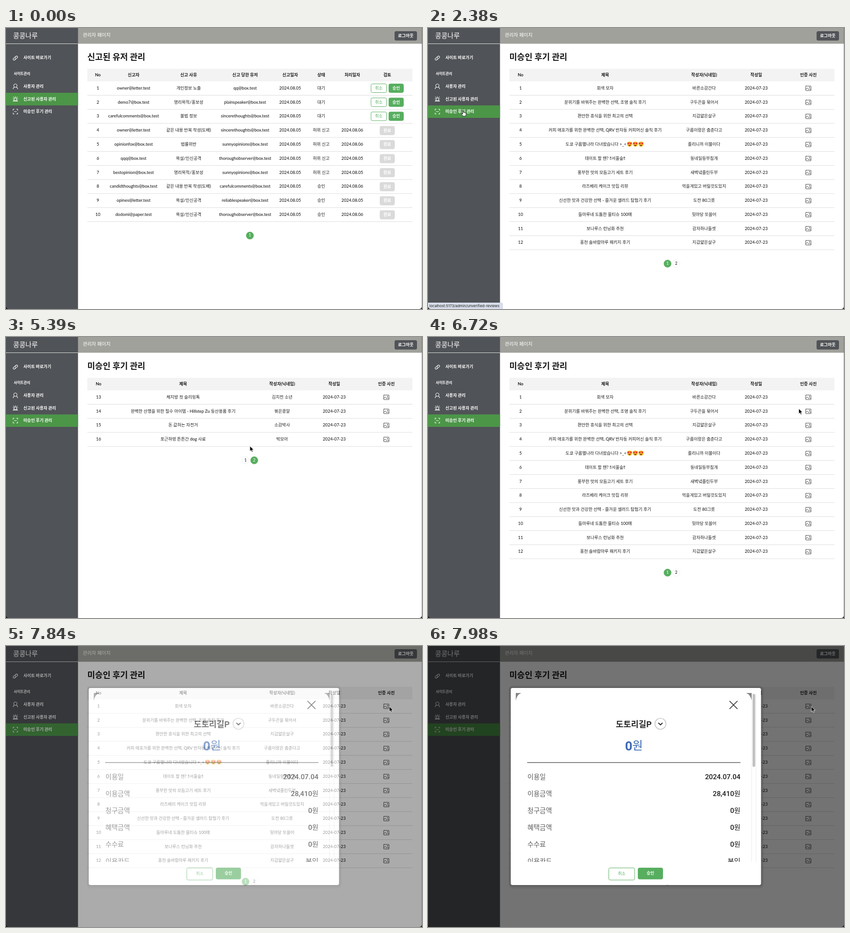
An HTML page that plays this animation: 910x616 px, repeating every 8000 ms.

```html
<!DOCTYPE html>
<html lang="ko">
<head>
<meta charset="utf-8">
<title>관리자 페이지</title>
<style>
html, body { margin: 0; width: 100%; height: 100%; overflow: hidden; background: #fff; }
svg { display: block; width: 910px; height: 616px; }
text { font: 500 9.3px Lato, "Noto Sans CJK KR", "Noto Sans CJK", sans-serif; fill: #1c1c1c; }
.mid { text-anchor: middle; }
.end { text-anchor: end; }
.bold { font-weight: 700; }
.line { fill: none; stroke-linecap: round; stroke-linejoin: round; }
.receipt text { font-family: Roboto, "Noto Sans CJK KR", "Noto Sans CJK", sans-serif; }
.receipt .bold { font-weight: 700; }

#reports, #reviews, #list1, #list2, #oldItem, #newItem, #status, #dialog, #cursor, #arrow, #hand, #ring {
  animation: 8s step-end infinite;
}
#reports { animation-name: reports; }
#reviews { animation-name: reviews; }
#list1 { animation-name: list1; }
#list2 { animation-name: list2; }
#oldItem { animation-name: oldItem; }
#newItem { animation-name: newItem; }
#status { animation-name: status; }
#dialog { animation-name: dialog; }
#cursor { animation-name: move; }
#arrow { animation-name: arrow; }
#hand { animation-name: hand; }
#ring { animation-name: ring; }

@keyframes reports { 0% { opacity: 1 } 28.875%, 100% { opacity: 0 } }
@keyframes reviews { 0% { opacity: 0 } 28.875%, 100% { opacity: 1 } }
@keyframes list1 { 0%, 74.375%, 100% { opacity: 1 } 55.125% { opacity: 0 } }
@keyframes list2 { 0%, 74.375%, 100% { opacity: 0 } 55.125% { opacity: 1 } }
@keyframes oldItem { 0% { opacity: 1 } 28.875% { opacity: .5 } 29.75%, 100% { opacity: 0 } }
@keyframes newItem {
  0% { opacity: 0 }
  16.625% { opacity: 0; animation-timing-function: steps(4) }
  20.125%, 100% { opacity: 1 }
}
@keyframes status {
  0% { opacity: 0 }
  21% { opacity: 0; animation-timing-function: steps(4) }
  24.5% { opacity: 1 }
  42% { opacity: 1; animation-timing-function: steps(3) }
  44.625%, 100% { opacity: 0 }
}
@keyframes dialog {
  0% { opacity: 0 }
  95.375% { opacity: 0; animation-timing-function: steps(5) }
  99.75%, 100% { opacity: 1 }
}
@keyframes arrow {
  0%, 17.5%, 50.75%, 70%, 91% { opacity: 0 }
  8.75%, 38.5%, 56%, 75.25%, 96.25%, 100% { opacity: 1 }
}
@keyframes hand {
  0%, 38.5%, 56%, 75.25%, 96.25%, 100% { opacity: 0 }
  17.5%, 50.75%, 70%, 91% { opacity: 1 }
}
@keyframes ring {
  0%, 28.875%, 55.125%, 74.375%, 96.25%, 100% { opacity: 0 }
  27.125%, 53.375%, 72.625%, 94.5% { opacity: 1 }
  52.5% { opacity: .5 }
}
@keyframes move {
  0% { transform: translate(367px, 520px) }
  8.75% { transform: translate(367px, 520px); animation-timing-function: steps(3) }
  11.375% { transform: translate(215px, 345px); animation-timing-function: steps(3) }
  14% { transform: translate(90px, 196px); animation-timing-function: steps(2) }
  15.75% { transform: translate(67px, 173px) }
  16.625% { transform: translate(67px, 173px); animation-timing-function: steps(7) }
  22.75% { transform: translate(77px, 181px) }
  37.625% { transform: translate(77px, 181px); animation-timing-function: steps(2) }
  39.375% { transform: translate(300px, 385px); animation-timing-function: steps(2) }
  41.125% { transform: translate(545px, 591px) }
  42% { transform: translate(545px, 591px); animation-timing-function: steps(3) }
  44.625% { transform: translate(559px, 545px); animation-timing-function: steps(3) }
  47.25% { transform: translate(549px, 508px); animation-timing-function: steps(4) }
  50.75% { transform: translate(542.5px, 515.5px) }
  62.125% { transform: translate(542.5px, 515.5px); animation-timing-function: steps(3) }
  64.75% { transform: translate(541px, 370px); animation-timing-function: steps(3) }
  67.375% { transform: translate(533.5px, 239px) }
  68.25% { transform: translate(531px, 235px); animation-timing-function: steps(3) }
  70.875% { transform: translate(525.5px, 267px) }
  79.625% { transform: translate(525.5px, 267px); animation-timing-function: steps(2) }
  81.375% { transform: translate(630px, 235px); animation-timing-function: steps(3) }
  84% { transform: translate(811px, 157px); animation-timing-function: steps(7) }
  90.125% { transform: translate(836px, 129px); animation-timing-function: steps(2) }
  91.875%, 100% { transform: translate(838.5px, 132.5px) }
}
</style>
</head>
<body>
<svg viewBox="0 0 910 616" xmlns="http://www.w3.org/2000/svg">
  <rect width="910" height="616" fill="#fff"/>
  <rect x="157" width="753" height="34.5" fill="#a1a19c"/>
  <rect width="157.5" height="616" fill="#505357"/>
  <path d="M0 34.5H157.5" stroke="#e4e4e4"/>
  <rect x="850" y="7" width="49" height="20.5" rx="3.5" fill="#505357"/>
  <g id="oldItem"><rect y="142" width="157.5" height="27.7" fill="#4c9648"/></g>
  <g id="newItem"><rect y="169.7" width="157.5" height="27.3" fill="#4c9648"/></g>
  <g class="line" stroke="#fff" stroke-width="1.1">
    <g transform="translate(20.5 66) rotate(-40)">
      <path d="M-.5 2.2H-3.6A2.2 2.2 0 0 1-3.6-2.2H-.6A2.2 2.2 0 0 1 1.4-.4"/>
      <path d="M.5-2.2H3.6A2.2 2.2 0 0 1 3.6 2.2H.6A2.2 2.2 0 0 1-1.4 .4"/>
    </g>
    <circle cx="20.5" cy="126.4" r="3.6"/>
    <path d="M15.5 133.5C16 131 17.3 129.9 18.8 129.5M25.5 133.5C25 131 23.7 129.9 22.2 129.5"/>
    <path d="M15.3 160.5H25.7M16.8 160.3V158.6H24.2V160.3M17.6 158.4V156A2.9 2.9 0 0 1 23.4 156V158.4M20.5 150V151.3M16.2 151.2L17.2 152.2M24.8 151.2L23.8 152.2M15 155H16M25 155H26"/>
    <path d="M15.5 180.5V178H18M23 178H25.5V180.5M25.5 186V188.5H23M18 188.5H15.5V186M18 183.2H23"/>
  </g>
  <g id="frame"></g>
  <g id="reports"></g>
  <g id="reviews"><g id="head"></g><g id="list1"></g><g id="list2"></g></g>
  <g id="status">
    <path d="M0 602H161Q164 602 164 605V616H0Z" fill="#d7dde9"/>
    <text x="3" y="611.8" style="font:400 8px Inter,sans-serif;fill:#222">localhost:5173/admin/unverified-reviews</text>
  </g>
  <g id="dialog">
    <rect width="910" height="616" fill="#000" opacity=".55"/>
    <rect x="176" y="86.5" width="558.5" height="445" rx="10" fill="#000" opacity=".07"/>
    <rect x="178.5" y="90" width="553" height="437" rx="6" fill="#000" opacity=".1"/>
    <rect x="181" y="92" width="547.5" height="432" rx="4" fill="#fff"/>
    <path d="M192 103H204Q194 107 192 120ZM708 103H696Q706 107 708 120Z" fill="#858585"/>
    <path d="M708 120V473M717.5 103V473" stroke="#e9e9e9"/>
    <rect x="710" y="105" width="5.8" height="160" rx="2.9" fill="#c1c1c1"/>
    <g class="line" stroke="#2a2a2a" stroke-width="1.7">
      <path d="M660 121L676.5 137.5M676.5 121L660 137.5"/>
      <circle cx="508.5" cy="170.5" r="12" stroke="#b0b0b0" stroke-width="1.2"/>
      <path d="M504.5 169L508.5 173L512.5 169" stroke-width="2"/>
    </g>
    <path d="M217 255.5H683.5" stroke="#555" stroke-width="1.3"/>
    <clipPath id="view"><rect x="192" y="103" width="516" height="370"/></clipPath>
    <g id="receipt" class="receipt" clip-path="url(#view)"></g>
    <g id="actions"></g>
  </g>
  <path d="M909.5 0V616" stroke="#555" opacity=".45"/>
  <path d="M0 610Q.5 615.5 6 616H0ZM910 610Q909.5 615.5 904 616H910Z" fill="#1d1712"/>
  <g id="cursor">
    <circle id="ring" r="20.8" fill="none" stroke="#555" stroke-width="1.2"/>
    <path id="arrow" d="M0 0V11.5L2.7 9.1 4.5 13.2 6.5 12.3 4.8 8.3H8.3Z" fill="#000" stroke="#fff" stroke-width=".9"/>
    <path id="hand" d="M-1.1 .9C-1.1-.4 1-.4 1 .9V4.6C1.4 3.8 2.9 3.9 3 5 3.5 4.2 4.8 4.5 4.8 5.5 5.4 5 6.3 5.4 6.3 6.3V8.5C6.3 10 5.4 10.8 5.2 12.2H-.6C-.9 10.8-3.8 8.6-3.6 7.4-3.4 6.5-2 6.6-1.1 7.9Z" fill="#fff" stroke="#000" stroke-width=".9"/>
  </g>
</svg>
<script>
const GREEN = '#57ae5f', PITCH = 30.78;
const put = (id, html) => { document.getElementById(id).innerHTML = html; };
const esc = s => String(s).replace(/</g, '&lt;').replace(/>/g, '&gt;');

// y is the vertical middle of the text
const label = (x, y, s, cls = 'mid', size = 9.3, fill = '#1c1c1c') =>
  `<text x="${x}" y="${y + size * .36}" class="${cls}" style="font-size:${size}px;fill:${fill}">${esc(s)}</text>`;

const button = (x, y, w, h, s, fill, color, edge = fill, size = 9) =>
  `<rect x="${x}" y="${y}" width="${w}" height="${h}" rx="3" fill="${fill}" stroke="${edge}"/>` +
  label(x + w / 2, y + h / 2 - .5, s, 'mid' + (fill === '#fff' ? '' : ' bold'), size, color);

const rowY = i => 131.5 + i * PITCH;
const rule = i => `<path d="M178 ${147.5 + i * PITCH}H889" stroke="#dcdcdc"/>`;

const heading = (title, cols, xs) =>
  label(178, 63.5, title, 'bold', 18.3, '#151515') +
  '<rect x="178" y="89.5" width="711" height="27.5" fill="#f3f3f3"/>' +
  cols.map((c, i) => label(xs[i], 102.7, c, 'mid bold')).join('');

const rows = (data, xs, extra) => data.map((r, i) =>
  r.map((c, k) => label(xs[k], rowY(i), c)).join('') + extra(i) + rule(i)).join('');

const pager = (count, active, n) => {
  const y = 147.5 + (n - 1) * PITCH + 30.5;
  return Array.from({ length: count }, (_, i) => {
    const x = 533.5 + (i - (count - 1) / 2) * 19, on = i + 1 === active;
    return `<circle cx="${x}" cy="${y}" r="8" fill="${on ? GREEN : '#fff'}" stroke="${on ? GREEN : '#ebebeb'}" stroke-width=".8"/>` +
      label(x, y - .8, i + 1, 'mid', 8.5, on ? '#fff' : '#1c1c1c');
  }).join('');
};

const white = (x, y, s, size = 9.1, cls = 'bold') => label(x, y, s, cls, size, '#fff');
put('frame',
  white(15.5, 17.2, '콩콩나루', 14.7, '') +
  white(168, 15.7, '관리자 페이지', 10.5, '') +
  white(874.5, 16.8, '로그아웃', 9.2, 'mid bold') +
  white(38, 65, '사이트 바로가기') +
  white(17, 100, '사이트관리', 7.8) +
  white(38, 128, '사용자 관리') +
  white(38, 155.5, '신고된 사용자 관리') +
  white(38, 182.8, '미승인 후기 관리'));

const owner = 'owner@letter.test', careful = 'carefulcomments@box.test',
  sincere = 'sincerethoughts@box.test', sunny = 'sunnyopinions@box.test',
  thorough = 'thoroughobserver@box.test';
const spam = '같은 내용 반복 작성(도배)', ad = '영리목적/홍보성', abuse = '욕설/인신공격';
const reports = [
  [owner, '개인정보 노출', 'qq@box.test'],
  ['demo7@box.test', ad, 'plainspeaker@box.test'],
  [careful, '불법 정보', sincere],
  [owner, spam, sincere, 6],
  ['opinionfox@box.test', '법률위반', sunny, 6],
  ['qqq@box.test', abuse, thorough, 5],
  ['bestopinion@box.test', ad, sunny, 5],
  ['candidthoughts@box.test', spam, careful, 6],
  ['opines@letter.test', abuse, 'reliablespeaker@box.test', 5],
  ['dodomi@paper.test', abuse, thorough, 6]
].map(([from, why, to, day], i) => [i + 1, from, why, to, '2024.08.05',
  !day ? '대기' : i < 7 ? '허위 신고' : '승인', day ? '2024.08.0' + day : '']);

const reportX = [201, 279, 399.5, 523, 621.5, 689.5, 757.5, 834];
const review = i => {
  const y = rowY(i) - 9;
  return i < 3
    ? button(798.5, y, 34, 19, '취소', '#fff', GREEN, GREEN) + button(837.5, y, 32, 19, '승인', GREEN, '#fff')
    : button(818, y + .5, 32, 19, '완료', '#dadada', '#fff');
};
put('reports',
  heading('신고된 유저 관리', ['No', '신고자', '신고 사유', '신고 당한 유저', '신고일자', '상태', '처리일자', '검토'], reportX) +
  rows(reports, reportX, review) + pager(1, 1, 10));

const reviewX = [202.5, 387.5, 604, 718, 832];
put('head', heading('미승인 후기 관리', ['No', '제목', '작성자(닉네임)', '작성일', '인증 사진'], reviewX));

const photo = i => `<g class="line" stroke="#333" stroke-width=".9" transform="translate(832 ${rowY(i) + .7})">
  <rect x="-5.8" y="-5" width="11.6" height="10" rx=".8"/><path d="M-5.5 2.5L-2.5-1 1 3 3 .8 5.6 3.5"/><circle cx="2.5" cy="-2" r=".7"/></g>`;

const heart = x => `<path transform="translate(${x} -1.5)" d="M0 2.3C-4.2-.6-1.6-3.2 0-1.2 1.6-3.2 4.2-.6 0 2.3Z" fill="#e5322d"/>`;
const face = x => `<g transform="translate(${x} 254.5)"><circle r="5.7" fill="#fbc02d"/>${heart(-2.7)}${heart(2.7)}
  <path d="M-2.7 1.7H2.7Q2 4.6 0 4.6-2 4.6-2.7 1.7Z" fill="#6b3a12"/></g>`;

const entries = (list, start) => list.map(([title, nick], i) => [start + i, title, nick, '2024-07-23']);
const first = entries([
  ['회색 모자', '바른소감간다'],
  ['분위기를 바꿔주는 완벽한 선택, 조명 솔직 후기', '구두끈을 묶어서'],
  ['편안한 휴식을 위한 최고의 선택', '지갑얇은살구'],
  ['커피 애호가를 위한 완벽한 선택, QRV 반자동 커피머신 솔직 후기', '구름이랑은 춤춘다고'],
  ['', '졸리니까 이불이다'],
  ['데이트 할 땐? ‼서울숲‼', '동네일등부침개'],
  ['풍부한 맛의 모듬고기 세트 후기', '새벽녘졸린두부'],
  ['라즈베리 케이크 맛집 리뷰', '먹을게있고 버릴것도있지'],
  ['신선한 맛과 건강한 선택 - 즐거운 샐러드 탐험기 후기', '도전 80그릇'],
  ['들마루네 도톰한 물티슈 100매', '뒷마당 또쓸어'],
  ['보나루스 런닝화 추천', '감자하나둘셋'],
  ['홍천 솔바람마루 패키지 후기', '지갑얇은살구']
], 1);
const second = entries([
  ['체지방 컷 슬리밍톡', '김치전 소년'],
  ['완벽한 산행을 위한 필수 아이템 - Hillstep Zu 등산용품 후기', '볶은콩알'],
  ['돈 값하는 자전거', '소감박사'],
  ['포근하멍 튼튼간 dog 사료', '박모아']
], 13);
put('list1', rows(first, reviewX, photo) + label(367.5, rowY(4), '도쿄 구름별나라 다녀왔습니다 >_<') +
  [441, 453.5, 466].map(face).join('') + pager(2, 1, 12));
put('list2', rows(second, reviewX, photo) + pager(2, 2, 4));

const bill = [['이용일', '2024.07.04'], ['이용금액', '28,410원'], ['청구금액', '0원'],
  ['혜택금액', '0원'], ['수수료', '0원'], ['이용카드', '본인']];
put('receipt',
  label(450, 171, '도토리길P', 'mid bold', 18.2, '#2a2a2a') +
  label(431, 218.5, '0', 'bold', 28, '#3b69b3') + label(447, 217.8, '원', '', 25, '#3b69b3') +
  bill.map(([name, value], i) => label(217.5, 286.8 + i * 37, name, '', 14.6, '#5c5c5c') +
    label(683.5, 286.8 + i * 37, value, 'end', 15.2, '#1c1c1c')).join(''));
put('actions',
  button(395.5, 486.5, 56.5, 26.5, '취소', '#fff', GREEN, GREEN, 9) +
  button(459.5, 486.5, 54, 24.5, '승인', GREEN, '#fff', GREEN, 9));
</script>
</body>
</html>
```
